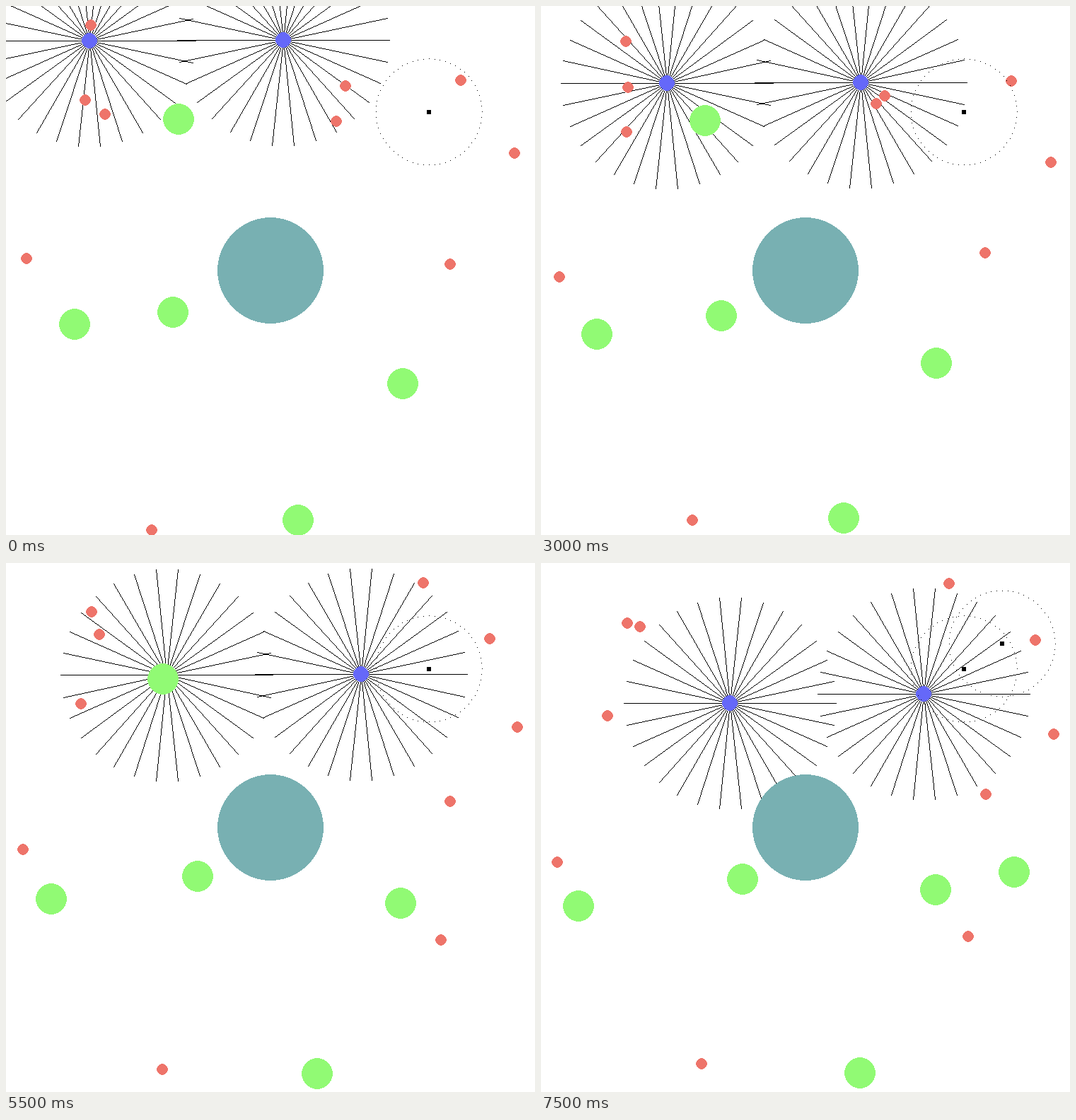
Write an HTML page with a canvas that moves like this. It is 748 px wide and 748 px high and loops after 8000 ms.

```html
<!DOCTYPE html>
<html lang="en">
<head>
<meta charset="utf-8">
<title>Particle pool</title>
<style>
  html, body { margin: 0; width: 100%; height: 100%; overflow: hidden; background: #fff; }
  canvas { display: block; }
</style>
</head>
<body>
<canvas id="stage" width="748" height="748"></canvas>
<script>
const SIZE = 748, STEP = 500, LAST = 15;
const CATCH = 8;            // two red dots are hit and reappear elsewhere
const TURN = LAST;          // the right agent is pushed up, a green dot reappears
const SPEED = SIZE / 75;    // agent motion per step on both axes
const RED = '#ee746a', GREEN = '#91fa74', BLUE = '#6568f9', TEAL = '#78b0b2';
const ctx = document.getElementById('stage').getContext('2d');

// Hard-edged disc by the midpoint rule
function disc(x, y, r, color) {
  ctx.fillStyle = color;
  x = Math.floor(x);
  y = Math.floor(y);
  for (let row = 1; row <= r; row++) {
    const half = row < r * Math.SQRT1_2
      ? Math.round(Math.sqrt(r * r - row * row))
      : Math.floor(Math.sqrt(r * r - (row - 0.5) ** 2));
    ctx.fillRect(x - half, y - row, half * 2, 1);
    ctx.fillRect(x - half, y + row - 1, half * 2, 1);
  }
}

// Hard-edged line, one pixel wide
function line(x0, y0, x1, y1) {
  const dx = x1 - x0, dy = y1 - y0;
  const n = Math.max(Math.abs(dx), Math.abs(dy));
  for (let i = 0; i <= n; i++) {
    ctx.fillRect(Math.round(x0 + dx * i / n), Math.round(y0 + dy * i / n), 1, 1);
  }
}

// Calls back with the whole-pixel points of a ring
function ring(x, y, r, count, plot) {
  for (let i = 0; i < count; i++) {
    const a = i * 2 * Math.PI / count;
    plot(Math.floor(x + r * Math.cos(a)), Math.floor(y + r * Math.sin(a)));
  }
}

function rays(x, y) {
  ctx.fillStyle = '#000';
  ring(x, y, 150, 30, (ex, ey) => line(Math.floor(x), Math.floor(y), ex, ey));
}

function marker(x, y) {
  ctx.fillStyle = '#000';
  ctx.fillRect(Math.round(x) - 3, Math.round(y) - 3, 6, 6);
  ring(x, y, 75, 60, (px, py) => ctx.fillRect(px, py, 1, 1));
}

// Both agents share one diagonal path
function agent(i, k) {
  const push = i === 1 && k >= TURN ? 12 : 0;
  return [118.2 + 274.1 * i + SPEED * k, 49.2 - i + SPEED * k - push];
}

function draw(k) {
  // Straight drift between two key points, reaching the second at the last step
  const drift = (r, color) => (x0, y0, x1, y1, from = 0) => {
    const p = (k - from) / (LAST - from || 1);
    disc(x0 + (x1 - x0) * p, y0 + (y1 - y0) * p, r, color);
  };
  const red = drift(8, RED), green = drift(22, GREEN);

  ctx.fillStyle = '#fff';
  ctx.fillRect(0, 0, SIZE, SIZE);

  const agents = [agent(0, k), agent(1, k)];
  agents.forEach(([x, y]) => rays(x, y));
  agents.forEach(([x, y]) => disc(x, y, 11, BLUE));
  disc(SIZE / 2, SIZE / 2, 75, TEAL);

  green(97, 450, 53, 485);
  green(236, 433, 285, 447);
  green(561, 534, 558, 462);
  green(413, 727, 451, 721);
  if (k < TURN) green(244, 160, 215, 166);
  else green(669, 437, 669, 437);

  red(120, 27, 122, 85);
  red(112, 133, 140, 90);
  red(140, 153, 94, 216);
  red(643, 105, 699, 109);
  red(719, 208, 725, 242);
  red(628, 365, 629, 327);
  red(29, 357, 23, 423);
  red(206, 741, 227, 708);
  if (k < CATCH) {
    red(480, 113, 495, 150);
    red(467, 163, 485, 101);
  } else {
    red(601, 28, 577, 29, CATCH);
    red(624, 538, 604, 528, CATCH);
  }

  marker(598.3, 149.7);
  if (k >= TURN) marker(652.2, 114.2);
}

let shown = -1;
function tick() {
  const k = Math.floor(performance.now() / STEP) % (LAST + 1);
  if (k !== shown) draw(shown = k);
  requestAnimationFrame(tick);
}
tick();
</script>
</body>
</html>
```
